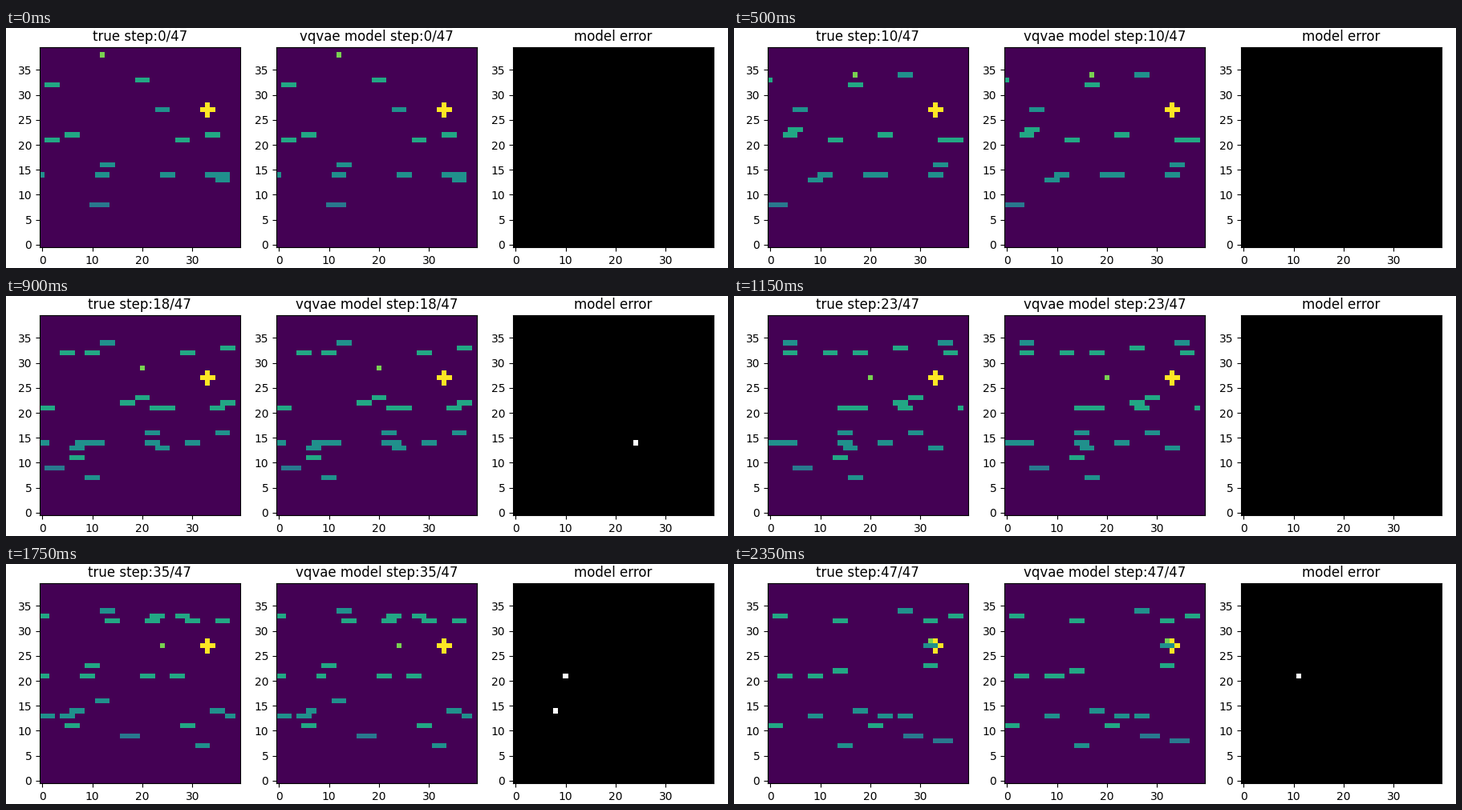
These frames come from a looping animation (900 px wide and 300 px high, 2400 ms). A matplotlib script:

```python
import math

import numpy as np
import matplotlib.pyplot as plt
from matplotlib.animation import FuncAnimation

W, H, DPI = 900, 300, 100
N = 40
LAST = 47

# Each lane has one speed in cells per step (negative runs left)
# and the steps at which its cars drive in at the edge.
LANES = {
    7: (1.32, [10.5, 35.4]),
    8: (-1, [-28, 42]),
    9: (0.9, [15.8]),
    11: (1.3, [12.6, 30.6, 46.2]),
    13: (1.84, [-19.6, 5, 14.2, 32.1, 34.5, 42.1]),
    14: (-1.4, [-28.6, -19, -9.7, -3.8, -2.1, 5.9, 11.9, 31.8]),
    16: (-1.42, [-18.6, 6.3, 16]),
    21: (-1.5, [-24.7, -7.3, 7.3, 8.7, 15.1, 23, 26.7]),
    22: (1.7, [-20, -3.5, 7.9, 38.9]),
    23: (1.8, [7, 29.5]),
    27: (-1.8, [-8.3, 43.1]),
    32: (1.5, [-1.2, 11.3, 14.7, 20.3, 26, 38]),
    33: (-2.15, [-8.8, 17, 27.6, 29.9, 46.1]),
    34: (-1.8, [3.4, 20.8, 40.3]),
}
LONG_LANES = (8, 9)
GREEN_LANES = (11, 21, 22, 23, 32, 33)

# Agent waypoints: step, column, row
ROUTE = np.array([(0, 12, 38), (10, 17, 34), (18, 20, 29), (20, 20, 27),
                  (28, 20, 27), (35, 24, 27), (40, 28, 27), (47, 32, 28)])

# Cells the model gets wrong: step, row, column
SLIPS = [(18, 14, 24), (35, 14, 8), (35, 21, 10), (47, 21, 11)]


def nearest(x):
    return math.floor(x + 0.5)


def shade(lane):
    return 0.4 if lane in LONG_LANES else 0.6 if lane in GREEN_LANES else 0.5


def draw_car(grid, lane, x):
    start = nearest(x) - 1
    end = start + (4 if lane in LONG_LANES else 3)
    # the last column always stays empty
    grid[lane, max(start, 0):max(min(end, N - 1), 0)] = shade(lane)


def world(step):
    grid = np.zeros((N, N))
    grid[27, 32:35] = grid[26:29, 33] = 1
    for lane, (speed, entries) in LANES.items():
        edge = 0 if speed > 0 else N - 1
        for entry in entries:
            if step >= entry:
                draw_car(grid, lane, edge + speed * (step - entry))
    times, cols, rows = ROUTE.T
    col, row = (nearest(np.interp(step, times, p)) for p in (cols, rows))
    grid[row, col] = 0.8
    return grid


def predict(grid, step):
    model = grid.copy()
    for when, row, col in SLIPS:
        if when == step:
            model[row, col] = 0 if grid[row, col] else shade(row)
    return model, model != grid


fig = plt.figure(figsize=(W / DPI, H / DPI), dpi=DPI, facecolor="white")


def panel(index, cmap):
    size = 249.6
    ax = fig.add_axes([(42 + 295 * index) / W, 26 / H, size / W, size / H])
    image = ax.imshow(np.zeros((N, N)), cmap=cmap, vmin=0, vmax=1,
                      origin="lower", interpolation="nearest", aspect="auto")
    ax.set_xticks(range(0, N, 10))
    ax.set_yticks(range(0, N, 5))
    return image, ax.set_title("")


true_im, true_title = panel(0, "viridis")
model_im, model_title = panel(1, "viridis")
error_im, error_title = panel(2, "gray")
error_title.set_text("model error")


def update(step):
    grid = world(step)
    model, error = predict(grid, step)
    true_im.set_data(grid)
    model_im.set_data(model)
    error_im.set_data(error.astype(float))
    true_title.set_text(f"true step:{step}/{LAST}")
    model_title.set_text(f"vqvae model step:{step}/{LAST}")
    return true_im, model_im, error_im, true_title, model_title


def reset():
    return update(0)


anim = FuncAnimation(fig, update, frames=LAST + 1, init_func=reset,
                     interval=50, repeat=True, repeat_delay=0, blit=False)
plt.show()
```
